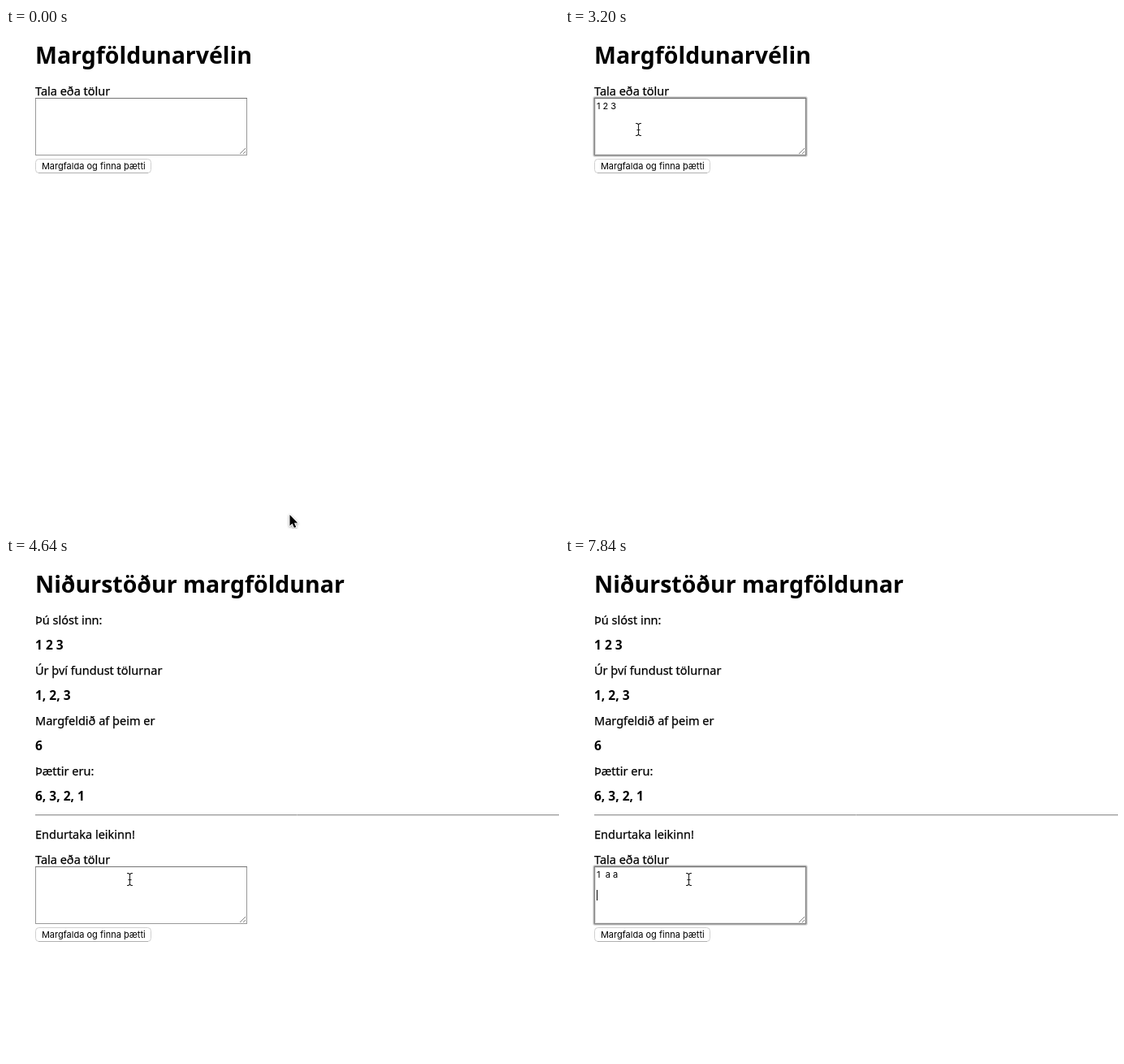
Write an HTML page with a canvas that moves like this. It is 681 by 617 pixels and loops after 8000 ms.

```html
<!DOCTYPE html>
<html lang="is">
<head>
<meta charset="utf-8">
<title>Margföldunarvélin</title>
<style>
  html, body { margin: 0; width: 100%; height: 100%; overflow: hidden; background: #fff; }
  canvas { display: block; }
</style>
</head>
<body>
<canvas id="stage" width="681" height="617"></canvas>
<script>
const ctx = document.getElementById('stage').getContext('2d');
const LOOP = 8000, TICK = 160, RESULT_AT = 3840, LEFT = 36;
const PAGE_FONT = '"Noto Sans", sans-serif';
const FIELD_FONT = '11px Inter, sans-serif';

// [start time, field text, caret visible]
const typing = [
  [0, '', false], [1120, '', true], [1600, '', false],
  [1920, '1', true], [2080, '1 ', true], [2240, '1 2', true],
  [2400, '1 2 ', true], [2560, '1 2 3', true], [3040, '1 2 3', false],
  [RESULT_AT, '', false], [4800, '', true], [5440, '', false],
  [5600, '1', true], [5760, '1  ', true], [6080, '1  ', false],
  [6560, '1  a', true], [7040, '1  a', false], [7360, '1  a a', true],
  [7680, '1  a a\n', true], [7840, '1  a a\n\n', true]
];

// [start, end, x, y]: pointer eases to (x, y)
const moves = [[0, 640, 81, 109], [3040, 3520, 117, 170], [4160, 4640, 152, 397]];
const focusSpans = [[1120, 3520], [4800, LOOP]];

function text(str, x, y, font) {
  ctx.font = font;
  ctx.fillStyle = '#000';
  ctx.fillText(str, x, y);
}

function line(color, width, ...pts) {
  ctx.strokeStyle = color;
  ctx.lineWidth = width;
  ctx.beginPath();
  pts.forEach(([x, y]) => ctx.lineTo(x, y));
  ctx.stroke();
}

function heading(str) { text(str, LEFT, 44, `bold 28.5px ${PAGE_FONT}`); }
function bold(str, y) { text(str, LEFT, y, `bold 15.5px ${PAGE_FONT}`); }
function plain(str, y) {
  text(str, LEFT, y, `14.5px ${PAGE_FONT}`);
  ctx.strokeStyle = '#000';
  ctx.lineWidth = .25;
  ctx.strokeText(str, LEFT, y);
}

function field(y, state, focused) {
  const [, value, caret] = state;
  if (focused) {
    for (const [grow, alpha] of [[2, .2], [1, .5]]) {
      ctx.strokeStyle = `rgba(90,90,90,${alpha})`;
      ctx.lineWidth = 1;
      ctx.beginPath();
      ctx.roundRect(LEFT + .5 - grow, y + .5 - grow, 260 + 2 * grow, 70 + 2 * grow, grow);
      ctx.stroke();
    }
  }
  ctx.fillStyle = '#fff';
  ctx.fillRect(LEFT + 1, y + 1, 259, 69);
  ctx.strokeStyle = focused ? '#888' : '#999';
  ctx.lineWidth = 1;
  ctx.strokeRect(LEFT + .5, y + .5, 260, 70);
  line('#747474', 1, [LEFT, y + .5], [LEFT + 261, y + .5]);
  if (focused) {
    ctx.strokeStyle = 'rgba(90,90,90,.15)';
    ctx.strokeRect(LEFT + 1.5, y + 1.5, 258, 68);
  }

  line('#777', .9, [288, y + 69], [295, y + 62]);
  line('#777', .9, [292, y + 69], [295, y + 66]);

  const rows = value.split('\n');
  rows.forEach((row, i) => text(row, 39, y + 14 + i * 13, FIELD_FONT));
  if (caret) {
    ctx.font = FIELD_FONT;
    const x = 39 + Math.floor(ctx.measureText(rows[rows.length - 1]).width);
    ctx.fillStyle = '#000';
    ctx.fillRect(x, y + 3 + (rows.length - 1) * 13, 1, 13);
  }
}

function button(y) {
  ctx.fillStyle = '#fff';
  ctx.strokeStyle = '#d0d0d0';
  ctx.lineWidth = 1;
  ctx.beginPath();
  ctx.roundRect(LEFT + .5, y + .5, 142, 17, 4);
  ctx.fill();
  ctx.stroke();
  line('#b0b0b0', 1, [LEFT + 4, y + 17.5], [LEFT + 139, y + 17.5]);
  ctx.textAlign = 'center';
  text('Margfalda og finna þætti', 107.8, y + 13, FIELD_FONT);
  ctx.textAlign = 'left';
}

function form(y, state, focused) {
  plain('Tala eða tölur', y - 3);
  field(y, state, focused);
  button(y + 75);
}

function results() {
  heading('Niðurstöður margföldunar');
  const pairs = [
    ['Þú slóst inn:', '1 2 3'],
    ['Úr því fundust tölurnar', '1, 2, 3'],
    ['Margfeldið af þeim er', '6'],
    ['Þættir eru:', '6, 3, 2, 1']
  ];
  pairs.forEach(([label, value], i) => {
    plain(label, 83 + i * 62);
    bold(value, 114 + i * 62);
  });
  line('#9a9a9a', 1, [LEFT, 317.5], [681, 317.5]);
  line('#e0e0e0', 1, [LEFT, 318.5], [681, 318.5]);
  plain('Endurtaka leikinn!', 347);
}

function pointerAt(t) {
  let x = 349, y = 599;
  for (const [start, end, toX, toY] of moves) {
    const u = Math.min(1, Math.max(0, (t - start) / (end - start)));
    const eased = u * u * (3 - 2 * u);
    x += (toX - x) * eased;
    y += (toY - y) * eased;
  }
  return [Math.round(x), Math.round(y)];
}

function arrow(x, y) {
  const shape = [[0, 0], [0, 13.6], [3.1, 10.8], [5.4, 16], [7.7, 15], [5.4, 10], [9.7, 10]];
  ctx.save();
  ctx.translate(x + .5, y + .5);
  ctx.beginPath();
  shape.forEach(([px, py]) => ctx.lineTo(px, py));
  ctx.closePath();
  ctx.lineJoin = 'round';
  ctx.lineWidth = 2;
  ctx.strokeStyle = '#fff';
  ctx.shadowColor = 'rgba(0,0,0,.4)';
  ctx.shadowBlur = 3;
  ctx.shadowOffsetY = 1;
  ctx.stroke();
  ctx.shadowColor = 'transparent';
  ctx.fillStyle = '#000';
  ctx.fill();
  ctx.restore();
}

function beam(x, y) {
  ctx.save();
  ctx.translate(x + .5, y);
  for (const [color, width] of [['#fff', 3], ['#222', 1.1]]) {
    line(color, width, [-3.5, -7.5], [-1.5, -7.5], [0, -6], [1.5, -7.5], [3.5, -7.5]);
    line(color, width, [-3.5, 7.5], [-1.5, 7.5], [0, 6], [1.5, 7.5], [3.5, 7.5]);
    line(color, width, [0, -6], [0, 6]);
    line(color, width, [-2, .5], [2, .5]);
  }
  ctx.restore();
}

function draw(now) {
  const t = Math.floor((now % LOOP) / TICK) * TICK;
  const showResults = t >= RESULT_AT;
  const top = showResults ? 381 : 86;
  const state = typing.filter(([start]) => start <= t).pop();
  const focused = focusSpans.some(([start, end]) => t >= start && t < end);

  ctx.fillStyle = '#fff';
  ctx.fillRect(0, 0, 681, 617);
  if (showResults) results();
  else heading('Margföldunarvélin');
  form(top, state, focused);

  const [x, y] = pointerAt(t);
  const overField = x > LEFT && x < 297 && y > top && y < top + 71;
  (overField ? beam : arrow)(x, y);
}

const began = performance.now();
function frame() {
  draw(performance.now() - began);
  requestAnimationFrame(frame);
}
frame();
</script>
</body>
</html>
```
